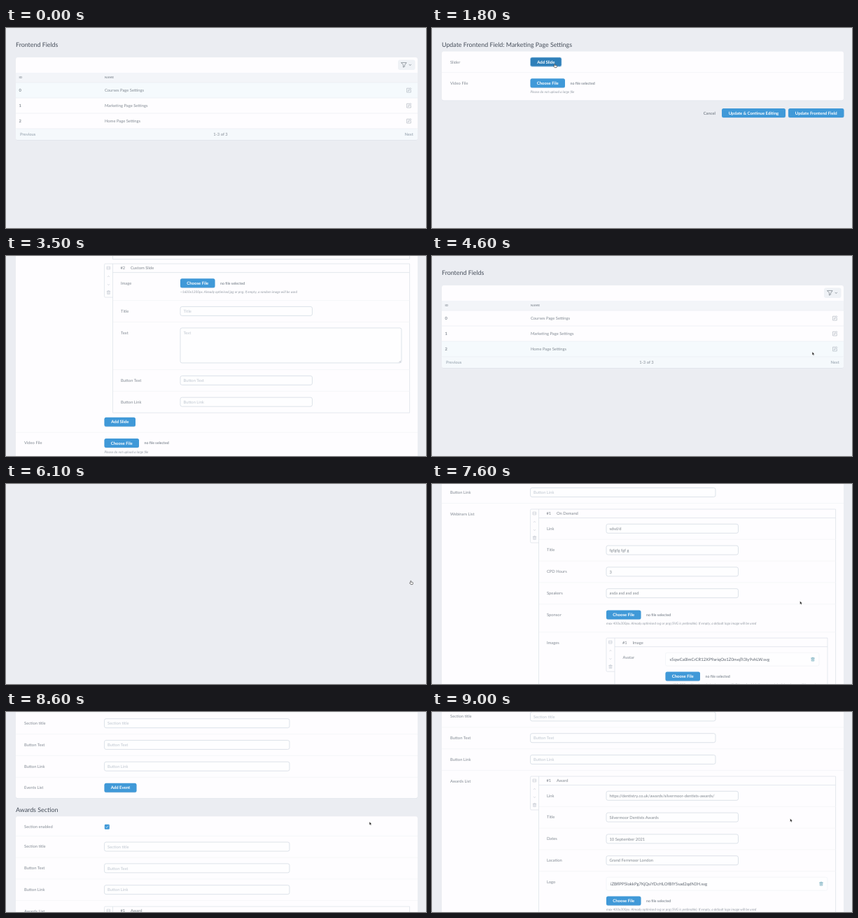
Recreate the animation shown at these times as an HTML page. Size 600 px wide and 286 px high, loop 9100 ms.

```html
<!DOCTYPE html>
<html lang="en">
<head>
<meta charset="utf-8">
<title>Frontend Fields</title>
<style>
  html, body { margin: 0; width: 100%; height: 100%; overflow: hidden; background: #ebedf2; }
  svg { display: block; width: 600px; height: 286px; }
  text { font-family: Lato, "Open Sans", sans-serif; font-size: 5.8px; fill: #838b94; text-rendering: geometricPrecision; }
  .title { font-size: 8.9px; fill: #454d59; }
  .bold { font-weight: 700; }
  .head { font-size: 4.1px; font-weight: 700; letter-spacing: .25px; }
  .hint { font-size: 4.8px; font-style: italic; fill: #959ca5; }
  .note { font-size: 5.3px; font-weight: 600; fill: #7a838d; }
  .value { fill: #80888f; }
  .blank { fill: #bec6cf; }
  .dark { font-size: 6px; fill: #59616b; }
  .pale { font-weight: 700; fill: #a9b4be; }
  .on { font-size: 6px; font-weight: 700; fill: #fff; }
  .icon { fill: none; stroke: #a3acb5; stroke-width: .6; stroke-linejoin: round; stroke-linecap: round; }
</style>
</head>
<body>
<svg viewBox="0 0 600 286" xmlns="http://www.w3.org/2000/svg">
  <g id="list"></g>
  <g id="edit0"></g>
  <g id="edit1"></g>
  <g id="edit2"></g>
  <g id="home"></g>
  <g id="cursor">
    <path id="arrow" d="M-1.3-2.6V1.9L-.3 1 .4 2.6 1.2 2.2.5.7H1.9Z" fill="#111" stroke="#fff" stroke-width=".35"/>
    <path id="hand" d="M-1.2.4V-2.3Q-.7-3.1-.2-2.3V-.8L2-.4Q2.6-.2 2.5.5L2 2.6H-1L-2.4.7Q-2.4-.2-1.2.4Z" fill="#fff" stroke="#333" stroke-width=".6"/>
  </g>
</svg>
<script>
const LOOP = 9100, STEP = 100;
const FIELD = 30.8, HEADER = 12.5;
const BORDER = '#cfd7e0', FRAME = '#dae0e7', RULE = '#f3f4f7', CONTROL = '#c0c7cf';
const $ = id => document.getElementById(id);
const sizes = { title: 8.9, head: 4.1, hint: 4.8, note: 5.3, on: 6, dark: 6 };
const marks = {};
let out = [];

const put = s => out.push(s);
const text = (x, y, s, cls = '', anchor = 'start') =>
  put(`<text x="${x}" y="${y + (sizes[cls] || 5.8) * .35}" class="${cls}" text-anchor="${anchor}">${s.replace(/&/g, '&amp;')}</text>`);
const rect = (x, y, w, h, fill, r = 0, stroke = 'none', extra = '') =>
  put(`<rect x="${x}" y="${y}" width="${w}" height="${h}" rx="${r}" fill="${fill}" stroke="${stroke}" stroke-width=".7" ${extra}/>`);
const line = (x1, x2, y, color = RULE) =>
  put(`<path d="M${x1} ${y}H${x2}" stroke="${color}" stroke-width=".7"/>`);
const icon = (x, y, d, color = '') =>
  put(`<path class="icon" transform="translate(${x} ${y})" d="${d}" ${color && `style="stroke:${color}"`}/>`);

const TRASH = 'M-2.3-1.7H2.3M-.8-1.7V-2.5H.8V-1.7M-1.8-1.7V2.4H1.8V-1.7M-.6-.5V1.3M.6-.5V1.3';
const PENCIL = 'M.6-2.8H-2.9V3H2.8V-.4M-.9 1L-.7-.5 2.5-3.4 3.4-2.5.4.7Z';

function card(y, h) {
  rect(14, y + .7, 574, h, '#dfe3ea', 3);
  rect(14, y, 574, h, '#fefdff', 3);
}

function button(x, y, label, w, id = '') {
  rect(x, y + .7, w, 13, '#cfdcea', 2.5);
  rect(x, y, w, 13, '#4099d8', 2.5, 'none', id && `class="${id}"`);
  text(x + w / 2, y + 6.5, label, 'on', 'middle');
}

// Column positions for each nesting depth
const cols = [
  { label: 26, x: 140.5, input: 405, end: 576.6, from: 14, to: 588 },
  { label: 164, x: 249, input: 437.5, end: 565, from: 153, to: 576.6 },
  { label: 272.5, x: 333.5, input: 443, end: 553, from: 261, to: 565 }
];

function input(x, y, x2, h, value, hint) {
  rect(x, y, x2 - x, h, '#fefeff', 2.5, BORDER);
  text(x + 4.5, y + 6.7, value || hint, value ? 'value' : 'blank');
}

const kinds = {
  text(y, c, label, value) {
    input(c.x, y + 8.8, c.input, 13, value, label);
    return FIELD;
  },
  area(y, c, label) {
    input(c.x, y + 8.5, c.end, 50, '', label);
    icon(c.end - 2.3, y + 56.5, 'M-1 1L1-1M.3 1L1 .3');
    return 68.2;
  },
  check(y, c) {
    rect(c.x + .3, y + 11.5, 7, 7, '#4099d8', 1.2);
    icon(c.x + 3.8, y + 15, 'M-1.6 0L-.5 1.2 1.7-1.3', '#fff');
    return 28;
  },
  file(y, c, label, hint, name) {
    let top = y + 8.7;
    if (name) {
      rect(c.x, y + 8.5, c.end - c.x, 19, '#fefeff', 2.5, '#eff2f6');
      text(c.x + 6, y + 18, name, 'dark');
      icon(c.end - 9, y + 18, TRASH, '#5e9fb4');
      top = y + 35.8;
    }
    button(c.x, top, 'Choose File', 49.5);
    text(c.x + 57, top + 6.5, 'no file selected', 'note');
    text(c.x, top + 19, hint, 'hint');
    return name ? 66.5 : 40;
  },
  list(y, c, label, items, add, w, id, depth) {
    let top = y + 8.5;
    items.forEach(([name, fields], i) => {
      const x = c.x, left = x + 12, at = out.length;
      const end = rows(fields, top + HEADER, depth + 1);
      const frame = `<path d="M${x} ${top + 1.5}q0-1.5 1.5-1.5H${c.end}V${end}H${left}V${top + 48}H${x + 1.5}q-1.5 0-1.5-1.5ZM${left} ${top}V${top + 48}M${left} ${top + HEADER}H${c.end}" fill="none" stroke="${FRAME}" stroke-width=".7"/>`;
      out.splice(at, 0, frame);
      icon(x + 6, top + 6, 'M-2-2H2V2H-2ZM-2 0H2', CONTROL);
      icon(x + 6, top + 18, 'M-1.2.6L0-.6 1.2.6', CONTROL);
      icon(x + 6, top + 30, 'M-1.2-.6L0 .6 1.2-.6', CONTROL);
      icon(x + 6, top + 41, TRASH, CONTROL);
      text(left + 11, top + 6.3, '#' + (i + 1), 'value');
      text(left + 25.5, top + 6.3, name, 'value');
      top = end + 6.5;
    });
    button(c.x, top, add, w, id);
    return top + 21.5 - y;
  }
};

function rows(fields, y, depth = 0) {
  const c = cols[depth];
  fields.forEach(([kind, label, a, b, w, id, mark], i) => {
    if (mark) marks[mark] = y;
    if (i) line(c.from, c.to, y);
    text(c.label, y + 15.1, label);
    y += kinds[kind](y, c, label, a, b, w, id, depth);
  });
  return y;
}

function section(y, title, fields, mark) {
  text(14, y + 16.3, title, 'title');
  const at = out.length, top = y + 26;
  if (mark) marks[mark] = top;
  const end = rows(fields, top);
  const body = out.splice(at);
  card(top, end - top);
  out.push(...body);
  return end;
}

function footer(y) {
  text(405, y + 18, 'Cancel', 'bold', 'end');
  button(414, y + 11.5, 'Update & Continue Editing', 91);
  button(509, y + 11.5, 'Update Frontend Field', 79.5);
}

function page(id, build) {
  out = [];
  build();
  $(id).innerHTML = out.join('');
}

const names = ['Courses', 'Marketing', 'Home'];
page('list', () => {
  text(14, 24, 'Frontend Fields', 'title');
  card(42, 118);
  rect(560, 45.5, 24.5, 14.5, '#eff2f6', 3);
  icon(568.5, 52.8, 'M-3.6-3.2H3.6L1 .3V2.4L-1 3.3V.3Z', '#59636e');
  icon(577.3, 52.8, 'M-1.3-.6L0 .7 1.3-.6', '#59636e');
  rect(14, 64, 574, 14, '#f3f5f9');
  text(18.5, 71, 'ID', 'head');
  text(141, 71, 'NAME', 'head');
  names.forEach((name, i) => {
    const y = 78 + 22 * i;
    rect(14, y, 574, 22, '#f5fafd', 0, 'none', 'class="row"');
    line(14, 588, y, '#e9edf2');
    text(18.5, y + 11, String(i), 'bold');
    text(141, y + 11, name + ' Page Settings');
    icon(575.5, y + 11, PENCIL);
  });
  rect(14, 144, 574, 16, '#f5f9fc', 3);
  line(14, 588, 144, '#e9edf2');
  text(20, 152.3, 'Previous', 'pale');
  text(306.5, 152.3, '1-3 of 3', '', 'middle');
  text(582, 152.3, 'Next', 'pale', 'end');
});

const slide = ['Custom Slide', [
  ['file', 'Image', '~1600x1200px. Already optimised jpg or png. If empty, a random image will be used'],
  ['text', 'Title'], ['area', 'Text'], ['text', 'Button Text'], ['text', 'Button Link']
]];
for (let n = 0; n < 3; n++) page('edit' + n, () => {
  footer(section(7.5, 'Update Frontend Field: Marketing Page Settings', [
    ['list', 'Slider', Array(n).fill(slide), 'Add Slide', 44.5, 'add'],
    ['file', 'Video File', 'Please do not upload a large file']
  ]));
});

const logoHint = 'max 400x300px. Already optimised svg or png (SVG is preferable). If empty, a default logo image will be used';
const intro = [['check', 'Section enabled'], ['text', 'Section title'], ['text', 'Button Text'], ['text', 'Button Link']];
const webinar = (values, images) => ['On Demand', [
  ...['Link', 'Title', 'CPD Hours', 'Speakers'].map((s, i) => ['text', s, values[i]]),
  ['file', 'Sponsor', logoHint],
  ['list', 'Images', images, 'Add layout', 48]
]];
const avatar = ['Image', [['file', 'Avatar', logoHint, 's5qwCa0lmCrCR12XP9ariqOo1Z0nvqTt3Iy9vhLW.svg']]];
const award = ['Award', [
  ['text', 'Link', 'https://dentistry.co.uk/awards/silvermoor-dentists-awards/'],
  ['text', 'Title', 'Silvermoor Dentists Awards'],
  ['text', 'Dates', '10 September 2021'],
  ['text', 'Location', 'Grand Fernmoor London'],
  ['file', 'Logo', logoHint, 'iZBflPP5lokkPg7KjQsiYDcHLOfBIY5sad2qdN3H.svg']
]];
page('home', () => {
  let y = section(7.5, 'Update Frontend Field: Home Page Settings', [['list', 'Slider', [slide], 'Add Slide', 44.5]]);
  y = section(y, 'Courses Section', intro);
  y = section(y, 'Webinars Section', [...intro,
    ['list', 'Webinars List', [webinar(['sdsd/d', 'fgfgfg fgf g', '3', 'asda asd asd asd'], [avatar]), webinar([], [])],
      'Add Webinar', 54, '', 'webinars']]);
  y = section(y, 'Events Section', [...intro, ['list', 'Events List', [], 'Add Event', 46]], 'events');
  y = section(y, 'Awards Section', [...intro, ['list', 'Awards List', [award], 'Add Award', 48, '', 'awards']]);
  footer(y);
});

// Eased interpolation through [time, ...values]
function track(t, keys) {
  const i = keys.findIndex(k => k[0] > t);
  if (i < 0) return keys[keys.length - 1].slice(1);
  if (!i) return keys[0].slice(1);
  const a = keys[i - 1], b = keys[i], p = (t - a[0]) / (b[0] - a[0]);
  const e = p * p * (3 - 2 * p);
  return a.slice(1).map((v, j) => v + (b[j + 1] - v) * e);
}

const pointer = [
  [200, 545, 93], [800, 576, 113], [1400, 576, 113], [1800, 176, 54], [2000, 176, 54], [2500, 176, 274],
  [2900, 176, 274], [4300, 530, 140], [5100, 576, 139], [5700, 579, 141], [6600, 579, 141],
  [7600, 527, 170], [8200, 528, 164], [9000, 513, 155]
];
const editScroll = [[2700, 0], [3200, 250.5]];
const homeScroll = [
  [6700, 0], [7600, marks.webinars - 27.5], [8200, marks.events - 159], [9000, marks.awards - 83.5]
];
const views = [
  [0, 'list'], [1000, ''], [1400, 'edit0'], [2000, 'edit1'], [2700, 'edit2'],
  [3900, 'list'], [5900, ''], [6500, 'home']
];
const within = (t, ...spans) => spans.some(([a, b]) => t >= a && t < b);

function draw(t) {
  const view = views.filter(v => v[0] <= t).pop()[1];
  for (const id of ['list', 'edit0', 'edit1', 'edit2', 'home'])
    $(id).style.display = id === view ? '' : 'none';
  $('edit2').setAttribute('transform', `translate(0 ${-track(t, editScroll)[0]})`);
  $('home').setAttribute('transform', `translate(0 ${-track(t, homeScroll)[0]})`);

  const [x, y] = track(t, pointer);
  const shown = within(t, [200, 2900], [4300, LOOP]);
  const hand = within(t, [700, 1400], [1700, 2100], [2400, 2900], [5000, 6700]);
  $('cursor').style.display = shown ? '' : 'none';
  $('cursor').setAttribute('transform', `translate(${x} ${y})`);
  $('arrow').style.display = hand ? 'none' : '';
  $('hand').style.display = hand ? '' : 'none';

  const hover = shown ? Math.floor((y - 78) / 22) : 0;
  document.querySelectorAll('.row').forEach((r, i) => r.setAttribute('fill', i === hover ? '#f5fafd' : '#fefdff'));
  const lit = within(t, [1700, 2100], [2400, 2800]);
  document.querySelectorAll('.add').forEach(b => {
    b.setAttribute('fill', lit ? '#2f7fb9' : '#4099d8');
    b.setAttribute('stroke', lit ? '#a9cdea' : 'none');
  });
}

const start = performance.now();
function tick() {
  const t = (performance.now() - start) % LOOP;
  draw(Math.floor(t / STEP) * STEP);
  requestAnimationFrame(tick);
}
tick();
</script>
</body>
</html>
```
